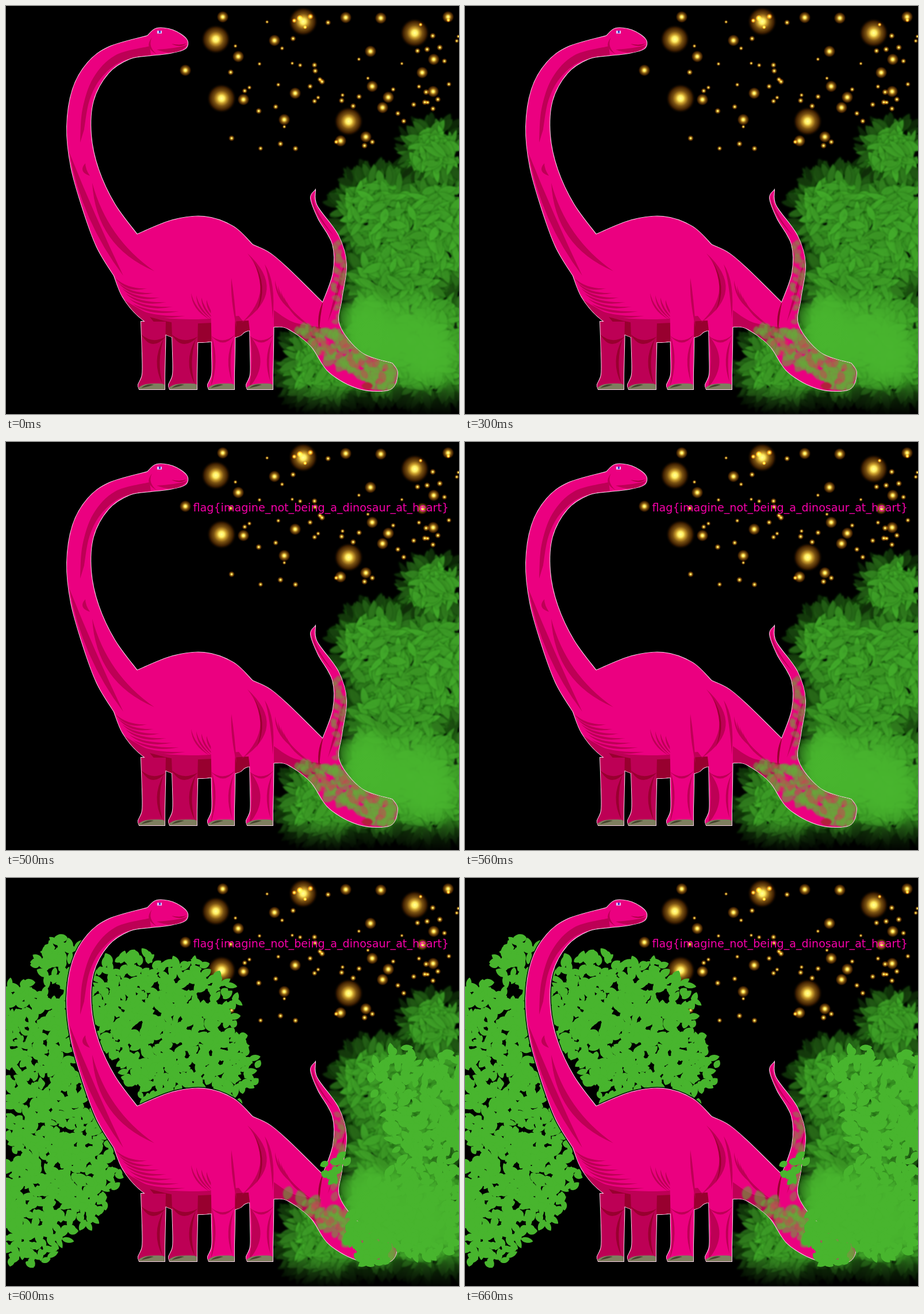
These frames come from a looping animation (788 by 711 pixels, 700 ms). An HTML page with a canvas:

```html
<!DOCTYPE html>
<html lang="en">
<head>
<meta charset="utf-8">
<title>Pink dinosaur</title>
<style>
  html, body { margin: 0; width: 100%; height: 100%; overflow: hidden; background: #000; }
  canvas { position: absolute; left: 0; top: 0; }
  p { position: absolute; left: 325.5px; top: 103px; margin: 0; color: #f500a8; white-space: nowrap;
      font: 19.15px/24px "DejaVu Sans", sans-serif; }
</style>
</head>
<body>
<canvas id="night" width="788" height="711"></canvas>
<canvas id="lush" width="788" height="711" hidden></canvas>
<p id="flag" hidden>flag{imagine_not_being_a_dinosaur_at_heart}</p>
<script>
const PINK = '#eb0080', SHADE = '#bd0055', DEEP = '#98002f', GREEN = '#48b52e';
const $ = id => document.getElementById(id);

function randomizer(seed) {
  return () => {
    seed = seed + 0x6D2B79F5 | 0;
    let t = Math.imul(seed ^ seed >>> 15, 1 | seed);
    t = t + Math.imul(t ^ t >>> 7, 61 | t) ^ t;
    return ((t ^ t >>> 14) >>> 0) / 4294967296;
  };
}

// Smooth curve through each list of points, with a corner between lists.
function trace(...parts) {
  const path = new Path2D();
  parts.forEach((xy, k) => {
    const n = xy.length / 2;
    const at = i => { i = Math.max(0, Math.min(n - 1, i)); return [xy[2 * i], xy[2 * i + 1]]; };
    k ? path.lineTo(...at(0)) : path.moveTo(...at(0));
    for (let i = 0; i < n - 1; i++) {
      const [a, b, c, d] = [at(i - 1), at(i), at(i + 1), at(i + 2)];
      path.bezierCurveTo(b[0] + (c[0] - a[0]) / 6, b[1] + (c[1] - a[1]) / 6,
        c[0] - (d[0] - b[0]) / 6, c[1] - (d[1] - b[1]) / 6, ...c);
    }
  });
  path.closePath();
  return path;
}

const body = trace(
  [188,470, 158,420, 134,355, 113,280, 106,210, 116,145, 142,99, 180,71, 246,52],
  [246,52, 262,39, 290,42, 314,58, 312,74, 286,82, 252,86],
  [252,86, 215,92, 178,117, 152,165, 148,225, 161,285, 189,345, 228,398],
  [228,398, 290,373, 345,367, 395,384, 429,416],
  [429,416, 458,430, 490,457, 551,517],
  [551,517, 569,465, 568,415, 543,370, 530,335, 538,321],
  [538,321, 541,348, 578,400, 592,450, 584,510, 580,556, 618,604, 672,623],
  [672,623, 681,640, 668,668, 615,667, 562,638, 530,592, 490,562, 468,559],
  [468,559, 420,566, 400,577, 331,586, 277,572, 231,541, 203,507, 188,470]);

const legSpans = [[235, 278], [288, 334], [356, 399], [423, 466]];
const legs = legSpans.map(([l, r], i) => {
  const top = i < 2 ? 550 : 515;
  return trace([l, top, l + 2, 605, l + 2, 642, l - 5, 660, l - 3, 668], [r - 2, 668, r - 2, 640, r - 1, 600, r, top]);
});

// Clumps of leaves: centre and radius.
const bushClumps = [[745,255,58], [650,360,85], [760,390,110], [680,480,98], [740,590,115], [650,600,95], [556,628,84]];
const leftClumps = [[100,150,50], [40,270,95], [70,400,105], [88,515,110], [35,590,85],
  [225,225,98], [290,310,100], [315,235,92], [355,335,85]];
const frontClumps = [[640,617,56], [725,565,100], [765,410,110], [690,350,60], [572,505,24]];

const bigStars = [[365,58], [517,27], [711,47], [375,161], [596,201]];
const midStars = [[377,19], [467,60], [591,20], [652,21], [769,19], [634,79], [744,93], [724,116], [743,149],
  [637,140], [665,159], [655,177], [503,152], [484,198], [582,235], [626,228], [312,112], [404,88], [413,163]];

function paint(c, lush) {
  const rnd = randomizer(11);
  const spread = w => (rnd() - .5) * w;
  const fill = (path, color) => { c.fillStyle = color; c.fill(path); };

  function leaf(x, y, len, wide, angle) {
    c.save();
    c.translate(x, y);
    c.rotate(angle);
    c.beginPath();
    c.moveTo(-len / 2, 0);
    c.bezierCurveTo(-len / 3, -wide * .7, len / 5, -wide * .7, len / 2, 0);
    c.bezierCurveTo(len / 5, wide * .7, -len / 3, wide * .6, -len / 2, 0);
    c.fill();
    c.restore();
  }

  // Random spots inside the clumps; depth runs from 0 at a centre to 1 at the rim.
  function spots(clumps, count) {
    const list = [];
    while (list.length < count) {
      const x = rnd() * 800 - 5, y = 90 + rnd() * 621;
      const near = clumps.map(([cx, cy, r]) => ({ x, y, depth: Math.hypot(x - cx, y - cy) / r, out: Math.atan2(y - cy, x - cx) }))
        .reduce((a, b) => a.depth < b.depth ? a : b);
      if (near.depth < 1) list.push(near);
    }
    return list;
  }

  function flatLeaves(clumps, count) {
    c.fillStyle = GREEN;
    for (const { x, y, depth, out } of spots(clumps, count))
      if (rnd() < 2.4 * (1.1 - depth)) leaf(x, y, 15 + rnd() * 10, 9 + rnd() * 5, out + spread(3));
  }

  function glow(x, y, r, stops) {
    const g = c.createRadialGradient(x, y, 0, x, y, r);
    stops.forEach(([at, color]) => g.addColorStop(at, color));
    c.fillStyle = g;
    c.fillRect(x - r, y - r, 2 * r, 2 * r);
  }

  const haze = (x, y, r) => glow(x, y, r, [[0, GREEN], [.45, 'rgba(72,181,46,.85)'], [1, 'rgba(72,181,46,0)']]);

  function bush() {
    const leaves = spots(bushClumps, 1600);
    leaves.forEach(s => s.order = s.depth + rnd() * .6);
    leaves.sort((a, b) => b.order - a.order);
    c.save();
    c.shadowColor = 'rgba(8,55,4,.6)';
    c.shadowBlur = 4;
    for (const { x, y, depth, out } of leaves) {
      const k = Math.min(1, .1 + (1 - depth) * 2.6) * (.84 + rnd() * .16);
      c.fillStyle = `rgba(${8 + 64 * k},${25 + 156 * k},${4 + 42 * k},.85)`;
      leaf(x, y, 26 + rnd() * 16, 9 + rnd() * 6, out + spread(depth > .7 ? 1.2 : 3));
    }
    c.restore();
    [[640, 590, 80], [705, 580, 90], [625, 540, 50], [740, 610, 60]].forEach(s => haze(...s));
    const fade = c.createLinearGradient(0, 660, 0, 711);
    fade.addColorStop(0, 'rgba(0,0,0,0)');
    fade.addColorStop(1, 'rgba(0,0,0,.9)');
    c.fillStyle = fade;
    c.fillRect(440, 660, 348, 51);
    c.filter = 'blur(1px)';
    c.drawImage(c.canvas, 0, 0);
    c.filter = 'none';
  }

  function stars() {
    const stops = [[0, '#ffff9c'], [.18, '#ffee62'], [.34, '#c4962a'], [.52, '#7a5212'], [.78, '#3a1c00'], [1, 'rgba(0,0,0,0)']];
    c.save();
    c.globalCompositeOperation = 'lighter';
    bigStars.forEach(([x, y]) => glow(x, y, 26, stops));
    midStars.forEach(([x, y]) => glow(x, y, 11, stops));
    for (let i = 0; i < 60; i++) {
      const x = 375 + rnd() * 413;
      glow(x, 18 + rnd() * (x < 660 ? 232 : 185), 3.5 + rnd() * 2.5, stops);
    }
    c.restore();
  }

  // Tapered crease along a quadratic curve.
  function fold(color, w, x1, y1, cx, cy, x2, y2) {
    const len = Math.hypot(x2 - x1, y2 - y1);
    c.fillStyle = color;
    c.beginPath();
    c.moveTo(x1, y1);
    c.quadraticCurveTo(cx, cy, x2, y2);
    c.quadraticCurveTo(cx - (y2 - y1) / len * w, cy + (x2 - x1) / len * w, x1, y1);
    c.fill();
  }

  function shadeNeck() {
    fill(trace([250,70, 190,86, 152,125, 133,180, 129,238], [136,215, 145,165, 165,126, 200,97, 252,85]), SHADE);
    fold(SHADE, 14, 138, 274, 138, 284, 146, 296);
    fold(SHADE, 24, 150, 308, 176, 405, 258, 462);
    fold(SHADE, -24, 110, 255, 132, 375, 204, 470);
    fold(SHADE, 7, 254, 55, 246, 70, 262, 84);
    fold(SHADE, 16, 262, 76, 295, 74, 315, 68);
    fold(DEEP, 3, 288, 66, 304, 70, 314, 65);
    c.fillStyle = '#d9c8ff';
    c.fillRect(263, 43, 8, 5);
    c.fillStyle = '#4a35c8';
    c.fillRect(266, 43, 3, 4);
  }

  function shadeBody() {
    for (let i = 0; i < 7; i++)
      fold(SHADE, 8, 190 + i * 6, 474 + i * 9, 212 + i * 8, 494 + i * 8, 246 + i * 11, 492 + i * 8);
    fill(trace([205,512, 260,540, 330,546, 405,540], [425,566, 357,590, 280,585, 215,535]), SHADE);
    fill(trace([250,542, 300,553, 360,552, 422,548], [424,566, 400,580, 330,590, 275,572]), DEEP);
    for (let i = 0; i < 5; i++) {
      fold(SHADE, 6, 322 + i * 9, 500 + i * 4, 328 + i * 8, 526, 354 + i * 4, 546);
      fold(SHADE, 6, 468 + i * 5, 478 + i * 9, 473 + i * 6, 505 + i * 8, 493 + i * 10, 528 + i * 8);
    }
    fill(trace([466,530, 500,551, 548,560], [540,600, 500,570, 466,562]), SHADE);
    fold(DEEP, 7, 552, 514, 546, 540, 545, 570);
    fold(SHADE, 10, 591, 440, 585, 490, 560, 550);
    fold(SHADE, 6, 533, 328, 534, 355, 570, 400);
  }

  function drawLegs() {
    legs.forEach((leg, i) => {
      const [l, r] = legSpans[i], far = i < 2;
      fill(leg, far ? SHADE : PINK);
      c.save();
      c.clip(leg);
      if (far) {
        fold(DEEP, 14, l, 572, l + 20, 590, r, 576);
        fold(DEEP, 10, r - 4, 580, r - 16, 620, r - 6, 658);
      } else {
        fold(SHADE, 8, l, 574, l + 22, 592, r, 572);
        fold(SHADE, i === 3 ? -30 : -8, l + 2, 575, l + 8, 620, l, 665);
        fold(SHADE, 8, r - 3, 580, r - 12, 615, r - 6, 655);
      }
      fill(trace([l - 6, 666, l + 8, 659, r - 8, 658, r, 662], [r, 672, l - 6, 672]), '#7e7e5e');
      fold('#45452f', 7, l, 666, l + 10, 657, l + 22, 660);
      c.restore();
    });
    fold(SHADE, 8, 392, 474, 398, 510, 401, 560);
    fold(SHADE, -22, 420, 431, 470, 495, 410, 552);
    fold(DEEP, 6, 430, 444, 458, 490, 436, 532);
    fold(SHADE, 10, 450, 450, 470, 480, 464, 545);
  }

  // Foliage colour mottled over the tail: up the raised end, along the base, over the tip.
  function camouflage() {
    const blot = (x, y, r, color) => { c.fillStyle = color; leaf(x, y, r * 2, r * 1.3, rnd() * 6.3); };
    c.save();
    c.clip(body);
    c.filter = 'blur(1px)';
    for (let i = 0; i < 32; i++) blot(580 + spread(22), 412 + i * 4.6, 5 + rnd() * 5, 'rgba(135,135,70,.55)');
    for (let i = 0; i < 130; i++) {
      const t = Math.sqrt(i / 130);
      blot(490 + t * 185, 562 + t * 78 + spread(30 + 50 * t), 7 + rnd() * 8, 'rgba(105,165,58,.6)');
    }
    for (let i = 0; i < 26; i++) {
      const t = i / 26;
      blot(530 + t * 135, 575 + t * 70 + spread(40), 4 + rnd() * 6, 'rgba(205,60,85,.5)');
    }
    blot(628, 662, 10, '#b3203c');
    c.restore();
  }

  function dinosaur() {
    c.strokeStyle = '#ffd4ea';
    c.lineWidth = 2;
    [body, ...legs].forEach(part => c.stroke(part));
    fill(body, PINK);
    c.save();
    c.clip(body);
    shadeNeck();
    shadeBody();
    c.restore();
    drawLegs();
    camouflage();
    haze(632, 572, 36);
  }

  c.fillStyle = '#000';
  c.fillRect(0, 0, 788, 711);
  bush();
  stars();
  if (lush) {
    flatLeaves(leftClumps, 2300);
    c.save();
    c.beginPath();
    c.rect(0, 0, 430, 711);
    c.clip();
    c.strokeStyle = '#000';
    c.lineWidth = 5;
    c.stroke(body);
    c.restore();
  }
  dinosaur();
  if (lush) flatLeaves(frontClumps, 750);
}

paint($('night').getContext('2d'), false);
paint($('lush').getContext('2d'), true);

function tick() {
  const t = performance.now() % 700;
  $('flag').hidden = t < 500;
  $('lush').hidden = t < 600;
  requestAnimationFrame(tick);
}
tick();
</script>
</body>
</html>
```
